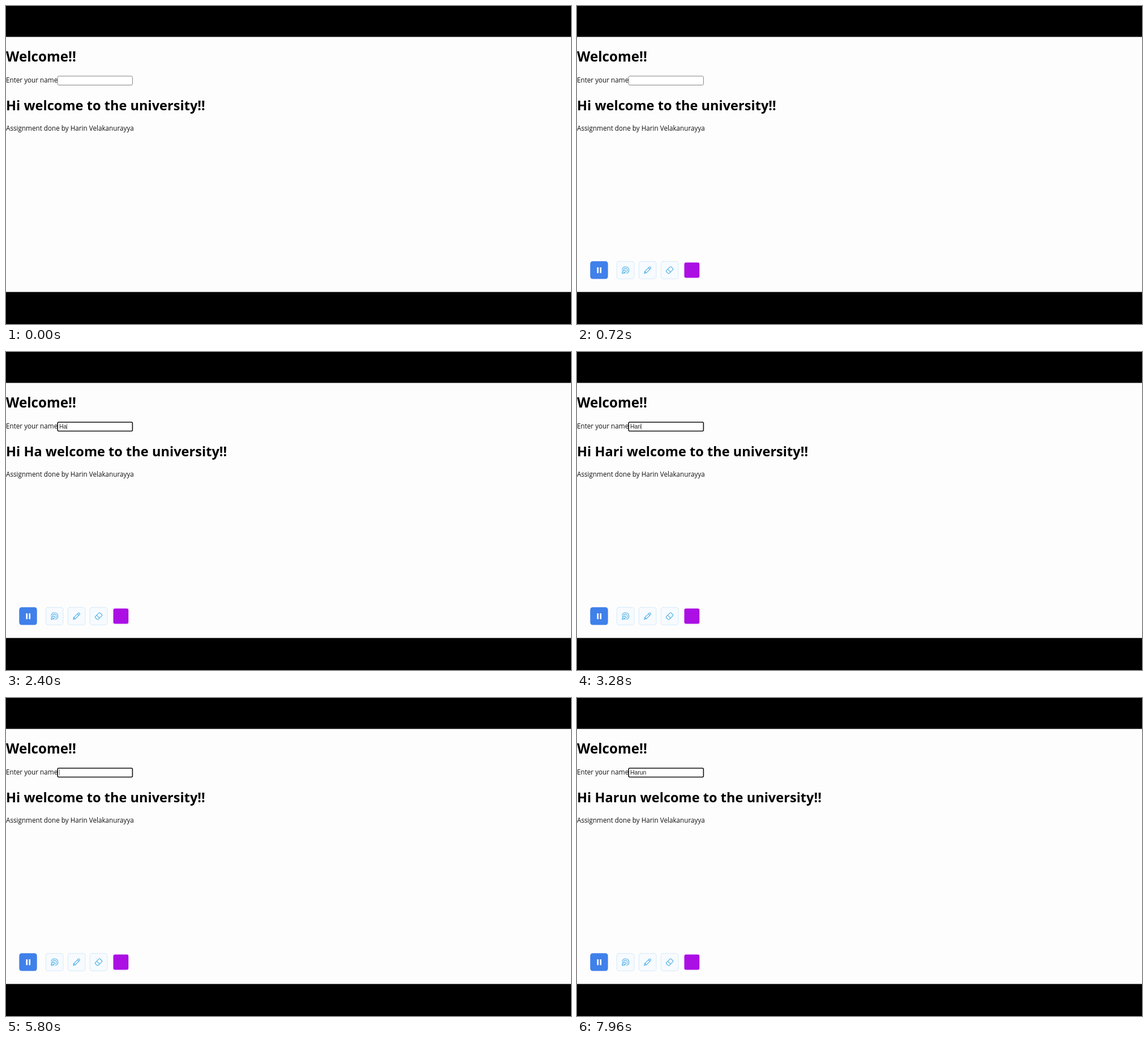
These frames come from a looping animation (998x561 px, 8000 ms). An HTML page:

```html
<!DOCTYPE html>
<html lang="en">
<head>
<meta charset="utf-8">
<title>Welcome form</title>
<style>
  html, body { margin: 0; width: 100%; height: 100%; overflow: hidden; background: #000; }
  svg { display: block; width: 100%; height: 100%; }
  text { font: 11.7px "Open Sans", "Noto Sans", sans-serif; fill: #111; }
  .heading { font-size: 23.6px; font-weight: 700; fill: #000; }
  .title { font-size: 24.2px; }
  #value { font: 10.4px "Liberation Sans", Arial, sans-serif; fill: #222; }
  #field { fill: #fff; stroke: #858585; stroke-width: 1; }
  #field.focused { stroke: #111; stroke-width: 1.6; }
  .tool { fill: #f7fbff; stroke: #c3e0f7; stroke-width: 1; stroke-dasharray: 2 1; }
  .icon { fill: none; stroke: #4aaee6; stroke-width: 1.1; stroke-linecap: round; stroke-linejoin: round; }
</style>
</head>
<body>
<svg viewBox="0 0 998 561">
  <rect width="998" height="561" fill="#000"/>
  <rect y="54.5" width="998" height="450" fill="#fdfdfd"/>

  <text class="heading title" x="0" y="98">Welcome!!</text>
  <text x="0" y="135">Enter your name</text>
  <rect id="field" x="91.2" y="123.7" width="132.2" height="15.8" rx="2"/>
  <text id="value" x="94" y="135"></text>
  <rect id="caret" y="126" width="0.8" height="10.5" fill="#555"/>
  <text id="greeting" class="heading" x="0" y="183.5"></text>
  <text x="0" y="220">Assignment done by Harin Velakanurayya</text>

  <g id="toolbar">
    <rect x="23.3" y="450.3" width="31.4" height="31.2" rx="4.5" fill="#3f80ea"/>
    <path d="M35.4 461h2.7v10.2h-2.7zM40.4 461h2.7v10.2h-2.7z" fill="#fff"/>

    <rect class="tool" x="70.3" y="450.7" width="30.6" height="30.6" rx="3.5"/>
    <g class="icon" transform="translate(85.6 466)">
      <path d="M-5.8 -1.2A6 6 0 1 1 1.8 5.7M-3.3 -.8A3.4 3.4 0 1 1 1.6 3"/>
      <path d="M0 0L-1 5.6-2.4 4-4.6 6.2-6.2 4.6-4 2.4-5.6 1Z"/>
    </g>

    <rect class="tool" x="109.3" y="450.7" width="30.6" height="30.6" rx="3.5"/>
    <path class="icon" transform="translate(124.6 466)"
      d="M-5.8 5.8L-4.8 2.2 3.2 -5.6Q4.2 -6.4 5.2 -5.4T5.6 -3.2L-2.2 4.8ZM1.6 -4L4 -1.6M-4.8 2.2L-2.2 4.8"/>

    <rect class="tool" x="148.3" y="450.7" width="30.6" height="30.6" rx="3.5"/>
    <g class="icon" transform="translate(163.6 466) rotate(-45)">
      <rect x="-6" y="-3.6" width="12" height="7.2" rx="1.5"/>
      <path d="M-1.2 -3.6V3.6"/>
    </g>

    <rect x="187.8" y="450.8" width="30" height="30.4" rx="4" fill="#fff" stroke="#f0eef3" stroke-width="0.8"/>
    <rect x="189.5" y="452.6" width="26.8" height="26.8" rx="3" fill="#ab0fe4"/>
  </g>
</svg>
<script>
  const LOOP = 8000, TOOLBAR_AT = 200, FOCUS_AT = 1000, BLINK = 530;

  // Each edit: time in ms, content of the field from then on.
  const edits = [
    [FOCUS_AT, ""],
    [2080, "H"], [2400, "Ha"], [2760, "Har"], [3080, "Hari"], [3320, "Harin"],
    [4400, "Hari"], [4480, "Har"], [4560, "Ha"], [4640, "H"], [4720, ""],
    [6160, "H"], [6480, "Ha"], [6880, "Har"], [7160, "Haru"], [7400, "Harun"]
  ];

  const [field, value, caret, greeting, toolbar] =
    ["field", "value", "caret", "greeting", "toolbar"].map(id => document.getElementById(id));
  const show = (node, visible) => node.setAttribute("visibility", visible ? "visible" : "hidden");

  function render(time) {
    const focused = time >= FOCUS_AT;
    const [editedAt, name] = edits.filter(([at]) => at <= time).pop() || edits[0];
    value.textContent = name;
    greeting.textContent = `Hi ${name ? name + " " : ""}welcome to the university!!`;
    field.classList.toggle("focused", focused);
    caret.setAttribute("x", 94 + (name ? value.getComputedTextLength() : 0));
    show(caret, focused && Math.floor((time - editedAt) / BLINK) % 2 === 0);
    show(toolbar, time >= TOOLBAR_AT);
  }

  const start = performance.now();
  function tick(now) {
    render(Math.max(0, now - start) % LOOP);
    requestAnimationFrame(tick);
  }
  render(0);
  requestAnimationFrame(tick);
</script>
</body>
</html>
```
